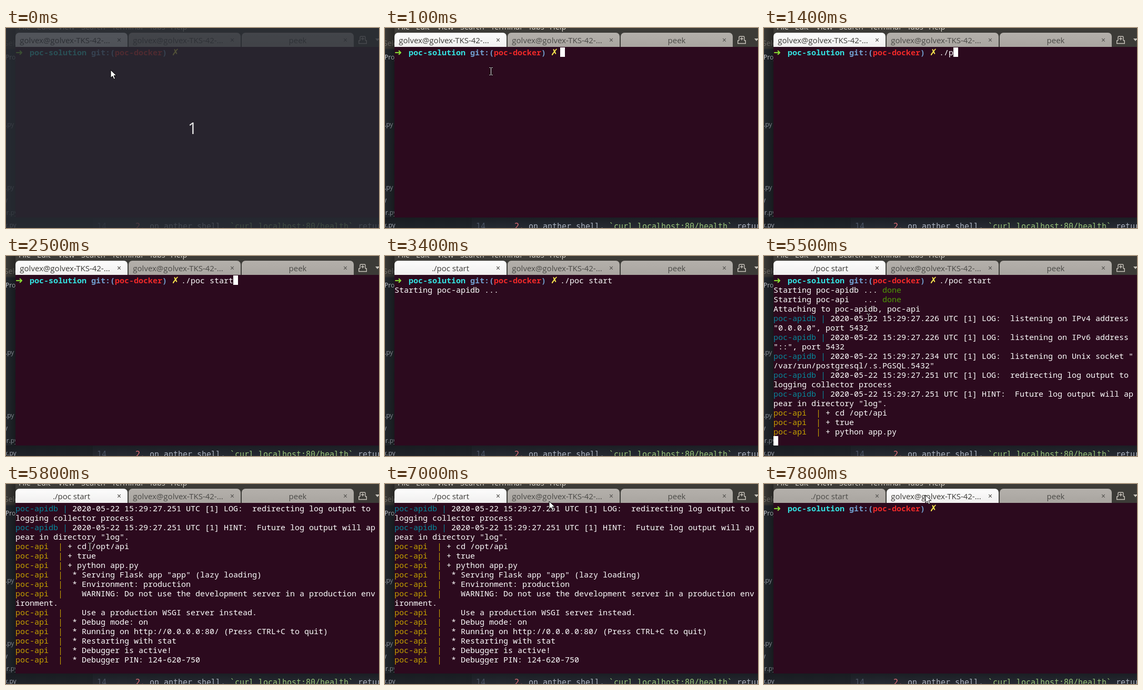
Recreate the animation shown at these times as an HTML page. Size 709 by 381 pixels, loop 8 s.

```html
<!DOCTYPE html>
<html lang="en">
<head>
<meta charset="utf-8">
<title>Terminal session</title>
<style>
  html, body { margin: 0; width: 100%; height: 100%; overflow: hidden; background: #22262c; }
  #stage { position: relative; width: 709px; height: 381px; overflow: hidden; font: 15px/18px 'Open Sans', 'Noto Sans', sans-serif; }
  #stage div, #stage svg { position: absolute; white-space: pre; }
  #side { left: 0; top: 0; width: 18px; height: 381px; overflow: hidden; background: linear-gradient(#3b3a36 38px, #22272d 42px); color: #a0a6b0; font-size: 12px; }
  #side .edge { left: 0; top: 0; width: 18px; height: 361px; background: linear-gradient(90deg, #0000, #0005); }
  #editor { left: 165px; top: 361px; width: 544px; height: 20px; overflow: hidden; background: linear-gradient(#1b1e24, #262a32); font: 15px/18px 'DejaVu Sans Mono', 'Liberation Mono', monospace; letter-spacing: -.03px; }
  #tree { left: 0; top: 361px; width: 165px; height: 20px; background: linear-gradient(#191c21, #1f2329); color: #a0a6b0; font-size: 12px; }
  #bar { left: 18px; top: 0; width: 691px; height: 36px; background: #3c3b37; overflow: hidden; }
  .menu { top: -11px; font-size: 14.5px; color: #dfdbd2; }
  .tab { top: 9px; width: 213px; height: 27px; border-radius: 7px 7px 0 0; background: linear-gradient(#b4b0ab, #a9a5a0); color: #4a4946; line-height: 28px; text-align: center; }
  .tab.on { background: linear-gradient(#fdfdfd, #f0efee); color: #3a3936; }
  .tab .name { left: 0; top: 0; width: 213px; }
  .tab .name.long { width: 188px; }
  .tab .close { top: 0; width: 14px; font-size: 14px; }
  #screen { left: 18px; top: 36px; width: 691px; height: 325px; background: #2c0a1e; color: #fff; overflow: hidden; font: 15px/18px 'Noto Sans Mono', 'DejaVu Sans Mono', monospace; }
  #rows { left: 0; top: 1px; }
  #block { width: 9px; height: 18px; background: #fff; }
  i { display: inline-block; width: 9px; height: 18px; vertical-align: top; font: 17px/18px 'DejaVu Sans', sans-serif; }
  #veil { left: 0; top: 0; width: 709px; height: 381px; background: rgba(39, 43, 51, .8); }
  #count { left: 0; top: 170px; width: 709px; text-align: center; font-size: 31px; line-height: 40px; color: #e6e6e6; }
</style>
</head>
<body>
<div id="stage">
  <div id="side">
    <div style="left:-3px;top:20px;color:#77756f;font-size:14px">Sele</div>
    <div style="left:-1px;top:47px;color:#d7dae0">Proj</div>
    <div style="left:-1px;top:175px">.py</div>
    <div style="left:-1px;top:295px">.py</div>
    <div style="left:-3px;top:319px">y</div>
    <div style="left:-6px;top:343px">er.py</div>
    <div class="edge"></div>
  </div>
  <div id="tree"><div style="left:-3px;top:6px">x.py</div></div>
  <div id="editor">
    <div style="left:8px;top:8px;color:#4b5363">14</div>
    <div style="left:81px;top:8px;color:#abb2bf"><span style="color:#e06c75">2.</span> on anther shell, <span style="color:#98c379">`curl localhost:80/health`</span> returns</div>
  </div>
  <div id="bar">
    <svg style="left:650px;top:12px" width="41" height="22" fill="none" stroke="#c9c5bd" stroke-width="1.4">
      <path d="M5 12V5.500Q5 4 6.500 4H13.500Q15 4 15 5.500V12M10 5.500V11.500M7 8.500H13M5 12H2.700V17.500H17.300V12H15"/>
      <path d="M34 8H42L38 13Z" fill="#c9c5bd" stroke="none"/>
    </svg>
  </div>
  <div id="screen"><div id="rows"></div><div id="block"></div></div>
  <div id="veil"><div id="count">1</div></div>
  <svg id="beam" width="9" height="18" fill="none">
    <path d="M1.500 1.500H3.500L4.500 2.500L5.500 1.500H7.500M4.500 2.500V14.500M1.500 15.500H3.500L4.500 14.500L5.500 15.500H7.500" stroke="#000" stroke-width="2.600" opacity=".7"/>
    <path d="M1.500 1.500H3.500L4.500 2.500L5.500 1.500H7.500M4.500 2.500V14.500M1.500 15.500H3.500L4.500 14.500L5.500 15.500H7.500" stroke="#fff"/>
  </svg>
  <svg id="arrow" width="14" height="21">
    <path d="M1 1V16L4.500 12.700L7 18.500L9.600 17.400L7.100 11.700H12Z" fill="#fff" stroke="#000"/>
  </svg>
</div>
<script>
const LOOP = 8000, COLS = 76, ROWS = 18, CELL = 9, LINE = 18;
const $ = id => document.getElementById(id);
const paint = (color, text) => `<span style="color:${color}">${text}</span>`;

function add(parent, cls, left, text) {
  const el = document.createElement('div');
  el.className = cls;
  el.style.left = left + 'px';
  el.textContent = text;
  parent.append(el);
  return el;
}

const menu = { File: 6, Edit: 41, View: 81, Search: 125, Terminal: 183, Tabs: 254, Help: 295 };
for (const [word, x] of Object.entries(menu)) add($('bar'), 'menu', x, word);

const SHELL = 'golvex@golvex-TKS-42-...', COMMAND = './poc start';
const tabs = [0, 215, 430].map(x => {
  const box = add($('bar'), 'tab', x, '');
  const name = add(box, 'name', 0, '');
  add(box, 'close', 190, '×');
  return { box, name };
});

const PROMPT = '<b>' + paint('#8ae234', '<i>➜</i>') + '  ' + paint('#34e2e2', 'poc-solution') + ' ' +
  paint('#729fcf', 'git:(') + paint('#ef2929', 'poc-docker') + paint('#729fcf', ')') + ' ' +
  paint('#fce94f', '<i>✗</i>') + '</b> ';

const db = (ms, text) => `poc-apidb | 2020-05-22 15:29:27.${ms} UTC [1] ${text}`;
const api = text => 'poc-api  | ' + text;
const LOG = [
  'Attaching to poc-apidb, poc-api',
  db(226, 'LOG:  listening on IPv4 address "0.0.0.0", port 5432'),
  db(226, 'LOG:  listening on IPv6 address "::", port 5432'),
  db(234, 'LOG:  listening on Unix socket "/var/run/postgresql/.s.PGSQL.5432"'),
  db(251, 'LOG:  redirecting log output to logging collector process'),
  db(251, 'HINT:  Future log output will appear in directory "log".'),
  api('+ cd /opt/api'),
  api('+ true'),
  api('+ python app.py'),
  api(' * Serving Flask app "app" (lazy loading)'),
  api(' * Environment: production'),
  api('   WARNING: Do not use the development server in a production environment.'),
  api('   Use a production WSGI server instead.'),
  api(' * Debug mode: on'),
  api(' * Running on http://0.0.0.0:80/ (Press CTRL+C to quit)'),
  api(' * Restarting with stat'),
  api(' * Debugger is active!'),
  api(' * Debugger PIN: 124-620-750'),
];
const wrap = text => text.match(new RegExp(`.{1,${COLS}}`, 'g'));
const tint = row => row.replace(/^poc-api(db)? +\|/, (head, isDb) => paint(isDb ? '#06879a' : '#c4a000', head));
const logRows = LOG.flatMap(wrap).map(tint);

// Step tables: [time, value]
const TYPED = [[0, 0], [800, 1], [1000, 2], [1400, 3], [1600, 4], [1700, 5], [1900, 7], [2100, 9], [2200, 10], [2500, 11]];
const PRINTED = [[0, 0], [2800, 1], [3400, 2], [4500, 3], [5500, 17], [5700, 25], [5800, 27]];
const POINTER = [
  [0, 'arrow', 199, 80], [100, 'beam', 201, 82], [600, ''], [3600, 'beam', 201, 82], [3700, 'beam', 201, 100],
  [3800, 'beam', 201, 117], [4900, 'beam', 198, 117], [5600, 'beam', 186, 118], [5700, 'beam', 172, 119],
  [5800, 'beam', 159, 119], [5900, 'beam', 153, 120], [6100, 'beam', 158, 120], [6300, 'beam', 168, 117],
  [6400, 'beam', 188, 110], [6500, 'beam', 228, 97], [6600, 'beam', 272, 82], [6700, 'beam', 305, 70],
  [6900, 'beam', 322, 50], [7000, 'arrow', 312, 33], [7200, 'arrow', 307, 21],
];
const at = (table, t) => table.findLast(step => step[0] <= t);

function place(el, x, y, shown) {
  el.style.display = shown ? 'block' : 'none';
  el.style.left = x + 'px';
  el.style.top = y + 'px';
}

function starting(name, done) {
  return `Starting ${name.padEnd(9)} ...` + (done ? ' ' + paint('#4e9a06', 'done') : '');
}

function drawTabs(t, second) {
  const names = [t < 2800 ? SHELL : COMMAND, SHELL, 'peek'];
  tabs.forEach(({ box, name }, i) => {
    box.classList.toggle('on', i === (second ? 1 : 0));
    name.textContent = names[i];
    name.classList.toggle('long', names[i] === SHELL);
  });
}

function draw(t) {
  const second = t >= 7400;
  const typed = second ? 0 : at(TYPED, t)[1];
  const printed = second ? 0 : at(PRINTED, t)[1];
  const all = [
    PROMPT + COMMAND.slice(0, typed),
    starting('poc-apidb', t >= 4500),
    starting('poc-api', t >= 5500),
    ...logRows,
  ].slice(0, Math.max(1, printed));
  const scroll = Math.max(0, printed + 1 - ROWS);
  $('rows').innerHTML = all.slice(scroll)
    .map((row, i) => `<div style="top:${i * LINE}px">${row}</div>`).join('');

  const blink = second ? t < 7800 : t < 2800 ? t >= 100 : Math.floor((t - 2800) / 600) % 2 === 0;
  const col = printed ? 0 : 35 + typed;
  place($('block'), col * CELL, 1 + (printed - scroll) * LINE, blink);

  drawTabs(t, second);
  $('veil').style.display = t < 100 ? 'block' : 'none';

  const [, kind, x, y] = at(POINTER, t);
  place($('beam'), x - 4, y - 8, kind === 'beam');
  place($('arrow'), x - 1, y - 1, kind === 'arrow');
}

const start = performance.now();
let last = -1;
function tick() {
  const t = Math.floor((performance.now() - start) % LOOP / 100) * 100;
  if (t !== last) draw(last = t);
  requestAnimationFrame(tick);
}
tick();
</script>
</body>
</html>
```
